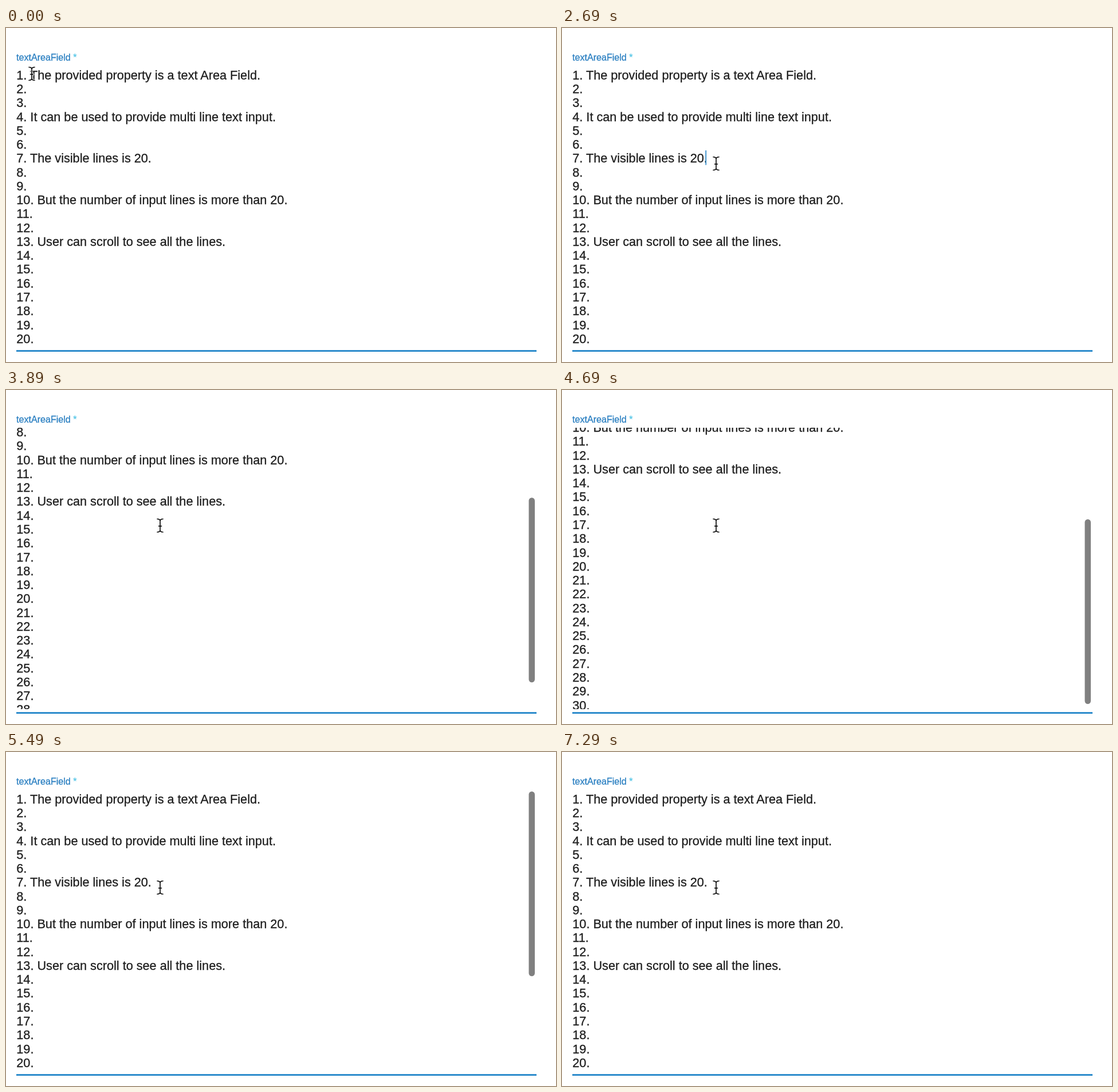
These frames come from a looping animation (960x584 px, 7490 ms). An HTML page:

```html
<!DOCTYPE html>
<html lang="en">
<head>
<meta charset="utf-8">
<title>Text area</title>
<style>
  html, body { margin: 0; width: 100%; height: 100%; overflow: hidden; background: #fff; }
  svg { display: block; }
  text { font-family: "Liberation Sans", Arial, sans-serif; white-space: pre; stroke-width: 0.3px; }
  #label { font-size: 16.1px; fill: #2a7fc1; stroke: #2a7fc1; }
  #label tspan { fill: #50c4e6; stroke: #50c4e6; }
  #lines text { font-size: 21.67px; fill: #1e1e1e; stroke: #1e1e1e; }
</style>
</head>
<body>
<svg width="960" height="584" viewBox="0 0 960 584">
  <text id="label" x="18" y="57">textAreaField <tspan>*</tspan></text>
  <svg y="66" width="960" height="492" viewBox="0 66 960 492">
    <g id="lines"><rect id="caret" x="250.4" y="214" width="1.6" height="25.5" fill="#2384c6"/></g>
    <rect id="thumb" x="912.5" width="10.5" height="323" rx="5.25" fill="#808080"/>
  </svg>
  <rect x="18" y="563.2" width="908" height="2.8" fill="#2185c9"/>
  <g id="pointer" fill="none" stroke-linecap="round">
    <path id="beam" d="M-5-11.5Q-1-11.5 0-9Q1-11.5 5-11.5M0-9V9M-5 11.5Q-1 11.5 0 9Q1 11.5 5 11.5M-2.5 1H2.5"/>
  </g>
</svg>
<script>
const LOOP = 7490, STEP = 200, LINE_HEIGHT = 24.27, LINE_COUNT = 30;
const sentences = {
  1: 'The provided property is a text Area Field.',
  4: 'It can be used to provide multi line text input.',
  7: 'The visible lines is 20.',
  10: 'But the number of input lines is more than 20.',
  13: 'User can scroll to see all the lines.'
};
const byId = id => document.getElementById(id);
const lines = byId('lines'), caret = byId('caret'), thumb = byId('thumb');
const pointer = byId('pointer'), beam = byId('beam');

function set(element, attributes) {
  for (const name in attributes) element.setAttribute(name, attributes[name]);
}

// The same beam twice: white halo below, black stroke on top.
const ink = pointer.appendChild(beam.cloneNode());
set(beam, { stroke: '#fff', 'stroke-width': 3.4 });
set(ink, { id: 'ink', stroke: '#000', 'stroke-width': 1.6 });

for (let n = 1; n <= LINE_COUNT; n++) {
  const row = document.createElementNS('http://www.w3.org/2000/svg', 'text');
  set(row, { x: 18.3, y: 89.7 + (n - 1) * LINE_HEIGHT });
  row.textContent = `${n}. ${sentences[n] || ''}`;
  lines.insertBefore(row, caret);
}

// Each run begins at a time and holds every value for one step.
const pointerRuns = [
  [0, [[45, 80]]],
  [490, [[43, 92], [40, 122], [42, 148], [46, 155]]],
  [1690, [[58, 134], [102, 98], [178, 142], [243, 208], [269, 237]]]
];
const scrollRuns = [
  [0, [0]],
  [3290, [36, 102, 145, 178.5, 220, 243]],
  [4690, [235, 190, 105, 28, 0]]
];

function valueAt(runs, t) {
  const [start, values] = runs.filter(run => run[0] <= t).pop();
  return values[Math.min(values.length - 1, Math.floor((t - start) / STEP))];
}

function draw() {
  const t = performance.now() % LOOP;
  const scroll = valueAt(scrollRuns, t);
  set(lines, { transform: `translate(0 ${-scroll})` });
  set(thumb, {
    y: 69 + scroll * 0.668,
    opacity: t < 3290 || t >= 6290 ? 0 : t < 6090 ? 1 : 0.5
  });
  set(caret, { opacity: t >= 2690 && (t - 2690) % 1000 < 600 ? 1 : 0 });
  set(pointer, { transform: `translate(${valueAt(pointerRuns, t)})` });
  requestAnimationFrame(draw);
}
draw();
</script>
</body>
</html>
```
